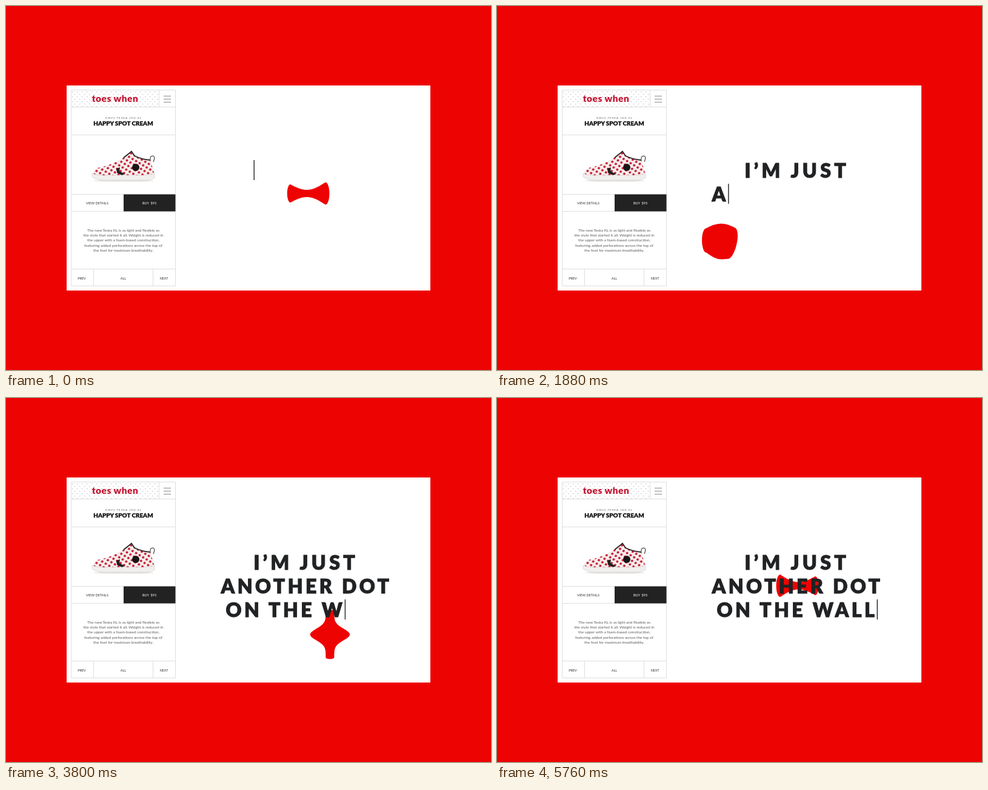
Recreate the animation shown at these times as an HTML page. Size 800 by 600 pixels, loop 5.8 s.

```html
<!DOCTYPE html>
<html lang="en">
<head>
<meta charset="utf-8">
<title>Just another dot</title>
<style>
  html, body { margin: 0; width: 100%; height: 100%; overflow: hidden; background: #ee0303; }
  svg { display: block; width: 800px; height: 600px; }
  text { font-family: Lato, "Open Sans", sans-serif; white-space: pre; }
  .mid { text-anchor: middle; }
  .rule { fill: none; stroke: #dedede; }
  .brand { font-size: 15.5px; font-weight: 900; letter-spacing: .5px; fill: #c4122f; }
  .kicker { font-size: 4.4px; letter-spacing: 1.05px; fill: #555; }
  .name { font-size: 9.9px; font-weight: 900; fill: #111; stroke: #111; stroke-width: .25px; }
  .label { font-size: 5.5px; fill: #333; }
  .copy { font-size: 6.4px; fill: #5a5a5a; }
  .line { font-size: 32px; font-weight: 900; letter-spacing: 4.4px; fill: #202224; stroke: #202224; stroke-width: .9px; }
  .airy { letter-spacing: 5.4px; }
</style>
</head>
<body>
<svg viewBox="0 0 800 600">
  <defs>
    <pattern id="specks" x="109" y="141" width="8" height="8" patternUnits="userSpaceOnUse">
      <rect width="1.3" height="1.3" fill="#bdbdbd"/>
      <rect x="4" y="4" width="1.3" height="1.3" fill="#bdbdbd"/>
    </pattern>
    <pattern id="spots" width="9.6" height="9.6" patternUnits="userSpaceOnUse" patternTransform="rotate(-14)">
      <rect width="9.6" height="9.6" fill="#f7f0ee"/>
      <circle cx="2.4" cy="2.4" r="2" fill="#c4142f"/>
      <circle cx="7.2" cy="7.2" r="2" fill="#c4142f"/>
    </pattern>
  </defs>

  <rect width="800" height="600" fill="#ee0303"/>
  <rect x="100" y="131" width="600" height="338" fill="#fff"/>

  <rect x="108" y="139" width="144" height="27" fill="url(#specks)"/>
  <path class="rule" d="M107.5 138.5h172v323h-172zM107.5 166.5h172M252.5 138.5v28M107.5 212.5h172M107.5 310.5h172M107.5 338.5h172M107.5 433.5h172M144.5 433.5v28M242.5 433.5v28"/>
  <path d="M260 148.5h12M260 153.5h12M260 158.5h12" stroke="#8c8c8c"/>
  <text class="brand mid" x="180" y="158">toes when</text>
  <text class="kicker mid" x="194" y="185.5">ORVU TESKA JOG KL</text>
  <text class="name mid" x="193.5" y="197.4">HAPPY SPOT CREAM</text>

  <g id="shoe">
    <ellipse cx="194" cy="288" rx="50" ry="1.6" fill="#e4e2e0"/>
    <path d="M143 277Q143 267 160 265Q188 257 202 243L207 240L212 247Q224 253 238 254Q241 264 245 278V281H143Z" fill="url(#spots)"/>
    <path d="M194 250L203 243L207 239.5L212 247Q224 253 238 254" fill="none" stroke="#2a2425" stroke-width="1.8"/>
    <path d="M238 255Q237 247 242 247Q247 248 243 257" fill="none" stroke="#444" stroke-width="1.2"/>
    <path d="M182 268l6-2-1 6 9 5-5 2-8-4z" fill="#211d1e"/>
    <circle cx="214" cy="266" r="6" fill="#181516"/>
    <path d="M142 276Q152 280 170 279H228Q240 279 245 275V283Q240 288 225 287H160Q145 286 142 281Z" fill="#f1efed" stroke="#d5d1ce" stroke-width=".7"/>
  </g>

  <rect x="194" y="310.5" width="85.5" height="28" fill="#222"/>
  <text class="label mid" x="150.5" y="327">VIEW DETAILS</text>
  <text class="label mid" x="236.5" y="327" style="fill:#fff">BUY  $95</text>
  <g class="copy mid">
    <text x="193.5" y="371.6">The new Teska KL is as light and flexible as</text>
    <text x="193.5" y="380">the style that started it all. Weight is reduced in</text>
    <text x="193.5" y="388.4">the upper with a foam-based construction,</text>
    <text x="193.5" y="396.8">featuring added perforations across the top of</text>
    <text x="193.5" y="405.2">the foot for maximum breathability.</text>
  </g>
  <text class="label mid" x="125" y="450.6">PREV</text>
  <text class="label mid" x="193.5" y="450.6">ALL</text>
  <text class="label mid" x="260.5" y="450.6">NEXT</text>

  <path id="blob" fill="#ee0303"/>
  <text class="line airy" x="408.5" y="283"></text>
  <text class="line" x="354.5" y="322"></text>
  <text class="line" x="362.5" y="361"></text>
  <rect id="caret" width="1.4" height="33" fill="#202224"/>
</svg>

<script>
const LOOP = 5800;
const LINES = ["I’M JUST", "ANOTHER DOT", "ON THE WALL"];
const blob = document.getElementById("blob");
const caret = document.getElementById("caret");
const rows = [...document.querySelectorAll("text.line")];
const clamp = (v, lo, hi) => Math.max(lo, Math.min(hi, v));

// The blob is a thick arc around (x, y): half length, angle and bend of its spine,
// half widths at start, middle and end, and how far the middle width spreads.
const shape = (x, y, half, start, middle, end, { angle = 0, bend = 0, spread = 1.5 } = {}) =>
  ({ x, y, half, start, middle, end, angle, bend, spread });
const pebble = (x, y, r) => shape(x, y, r * .72, r * .7, r, r * .7);

const tilt = shape(498, 309, 29, 15, 6, 18.5);
const bow = shape(496, 309.5, 29, 18.5, 6, 15.5);
const keys = [
  [0, tilt], [300, bow], [760, bow], [920, bow],
  [1280, shape(449, 366, 54, 7, 8.5, 2.5, { angle: -1.15, bend: -1.4 })],
  [1720, pebble(345, 404, 32)],
  [2400, shape(511.5, 311, 24, 6, 9, 32.5, { angle: .06 })],
  [2720, pebble(622, 358, 28)],
  [3120, shape(622, 399, 47, 6.5, 20, 6.5, { angle: -.84, bend: 1.3, spread: .6 })],
  [3430, pebble(592, 427, 29)],
  [3800, shape(534.5, 390, 38, 7, 33, 7, { angle: -Math.PI / 2, spread: .35 })],
  [4170, shape(497, 309, 40, 24, 8, 22, { angle: .38 })],
  [4480, bow], [LOOP, bow]
];

// Velocity at a key: central difference, zero where the shape holds.
function speed(k, name) {
  const a = keys[k - 1], b = keys[k], c = keys[k + 1];
  if (!a || !c || a[1] === b[1] || b[1] === c[1]) return 0;
  return (c[1][name] - a[1][name]) / (c[0] - a[0]);
}

function shapeAt(t) {
  const k = keys.findIndex((key, i) => t < keys[i + 1][0]);
  const [t0, a] = keys[k], [t1, b] = keys[k + 1];
  const d = t1 - t0, u = (t - t0) / d, u2 = u * u, u3 = u2 * u;
  const out = {};
  for (const name in a) {
    out[name] = a[name] * (2 * u3 - 3 * u2 + 1) + b[name] * (3 * u2 - 2 * u3)
      + speed(k, name) * d * (u3 - 2 * u2 + u) + speed(k + 1, name) * d * (u3 - u2);
  }
  return out;
}

// Walks along one side, round the end cap, back along the other side, round the other cap.
function outline({ x, y, half, start, middle, end, angle, bend, spread }) {
  const b = bend || 1e-6, q = Math.max(.3, spread), steps = 24;
  const falloff = s => 1 - Math.exp(-((s / q) ** 2));
  const width = s => Math.max(1.5,
    middle + (end - start) / 2 * s + ((start + end) / 2 - middle) * falloff(s) / falloff(1));
  const place = (s, along, across) => {
    const u = Math.sin(b * s) / b * half, v = (1 - Math.cos(b * s)) / b * half;
    const c = Math.cos(angle), n = Math.sin(angle), h = angle + b * s;
    return [
      x + u * c - v * n + along * Math.cos(h) - across * Math.sin(h),
      y + u * n + v * c + along * Math.sin(h) + across * Math.cos(h)
    ].map(p => p.toFixed(2));
  };
  const pts = [];
  for (const dir of [1, -1]) {
    for (let i = 0; i <= steps; i++) {
      const s = dir * (2 * i / steps - 1);
      pts.push(place(s, 0, -dir * width(s)));
    }
    const w = width(dir);
    for (let i = 1; i < 12; i++) {
      const a = Math.PI * i / 12;
      pts.push(place(dir, dir * .35 * w * Math.sin(a), -dir * w * Math.cos(a)));
    }
  }
  return "M" + pts.join("L") + "Z";
}

// Four characters, a pause, then a steady pace.
function typed(t) {
  if (t < 940) return 0;
  if (t < 1470) return Math.min(4, Math.floor((t - 940) / 60) + 1);
  return Math.min(30, Math.floor((t - 1470) / 102) + 5);
}

function caretOpacity(t) {
  if (t > 1420 && t < 4400) return 1;
  const p = (t + (t < 1420 ? 840 : 240)) % 1000;
  return p < 200 ? 1 - p / 200 : clamp((p - 480) / 120, 0, 1);
}

function draw(t) {
  blob.setAttribute("d", outline(shapeAt(t)));
  let left = typed(t), row = rows[0];
  LINES.forEach((line, i) => {
    const part = line.slice(0, Math.max(0, left));
    if (rows[i].textContent !== part) rows[i].textContent = part;
    if (part) row = rows[i];
    left -= line.length;
  });
  const width = row.textContent ? row.getComputedTextLength() - .5 : 0;
  caret.setAttribute("x", +row.getAttribute("x") + width);
  caret.setAttribute("y", row.getAttribute("y") - 29);
  caret.setAttribute("opacity", caretOpacity(t));
}

const start = performance.now();
function tick() {
  draw((performance.now() - start) % LOOP);
  requestAnimationFrame(tick);
}
tick();
</script>
</body>
</html>
```
